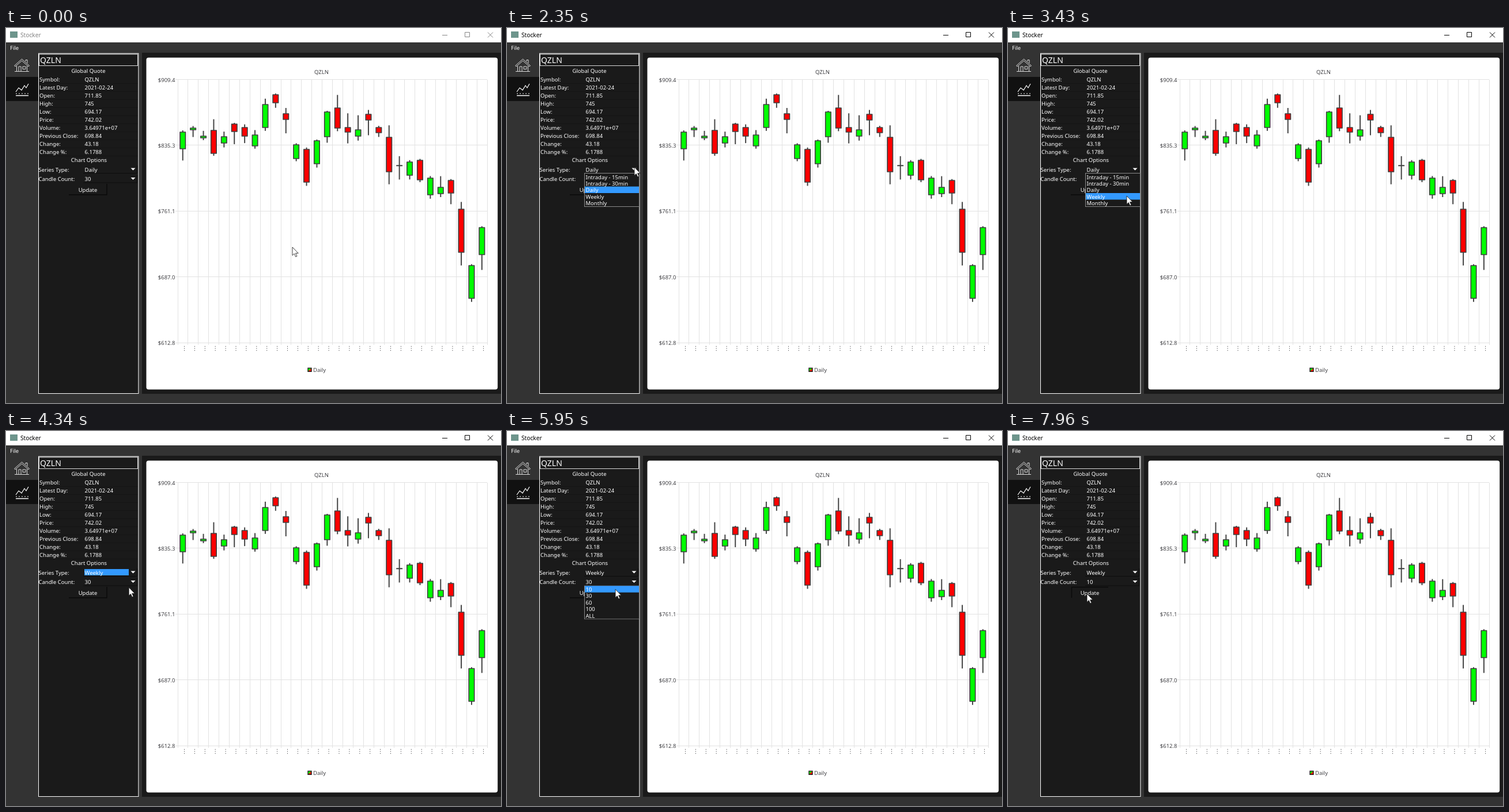
An HTML page for the animation above (8000 ms loop, 859x652 px).

```html
<!DOCTYPE html>
<html lang="en">
<head>
<meta charset="utf-8">
<title>Stocker</title>
<style>
  html, body { margin: 0; width: 100%; height: 100%; overflow: hidden; background: #333; }
  svg { display: block; }
  text { font: 9.5px "Noto Sans", "Open Sans", sans-serif; fill: #fff; white-space: pre; }
  .mid { text-anchor: middle; }
  .chart text { fill: #404044; }
  .crisp { shape-rendering: crispEdges; }
</style>
</head>
<body>
<svg id="stage" width="859" height="652" viewBox="0 0 859 652"></svg>
<script>
const LOOP = 8000;
const SYMBOL = 'QZLN';
const ROW = 11.4;

const rect = (x, y, w, h, fill, extra = '') =>
  `<rect x="${x}" y="${y}" width="${w}" height="${h}" fill="${fill}" ${extra}/>`;
const text = (x, y, s, extra = '') => `<text x="${x}" y="${y}" ${extra}>${s}</text>`;
const path = (d, stroke, width = 1, extra = '') =>
  `<path d="${d}" fill="none" stroke="${stroke}" stroke-width="${width}" ${extra}/>`;
const crisp = 'class="crisp"';
const centred = 'class="mid"';

function titleBar() {
  return rect(0, 0, 859, 25, '#fff') + rect(7, 6, 13, 11, '#6d958c') +
    text(25, 15.5, 'Stocker', 'id="caption" style="font-size:10.2px;fill:inherit"') +
    path('M757 12.5h9M796.5 7.5h8v8h-8zM836 7.5l9 9M845 7.5l-9 9', '', 1, 'id="controls"') +
    text(7, 38, 'File');
}

function sideBar() {
  const roof = 'M14.5 65.5L27.5 54L40.5 65.5L39 67L27.5 57L16 67Z';
  const walls = 'M34 58V55.5h3V61M18.5 66V75.5M36.5 66V75.5M15 75.5H40';
  const openings = 'M22 75V67h4V75M29 67h5v4.5h-5z';
  return rect(0, 85, 56, 42, '#111') + path(roof + walls + openings, '#eee', .9) +
    path('M17 111L22 104L27 108L32 100L35 104L39 97', '#fff', 1.2) +
    path('M17 114H39', '#fff', 1, 'stroke-dasharray="2 3"') + path('M17 117.5H39', '#fff', 1.5);
}

function quotePanel() {
  const quote = {
    'Symbol:': SYMBOL, 'Latest Day:': '2021-02-24', 'Open:': '711.85', 'High:': '745',
    'Low:': '694.17', 'Price:': '742.02', 'Volume:': '3.64971e+07',
    'Previous Close:': '698.84', 'Change:': '43.18', 'Change %:': '6.1788' };
  const rows = Object.entries(quote).map(([label, value], i) => {
    const y = 92.5 + 14 * i;
    return text(58, y, label) + text(136.5, y, value) + rect(57, y + 3, 172, 1, '#151515', crisp);
  }).join('');
  return rect(56.5, 44.2, 173.4, 591.3, '#1a1a1a', 'stroke="#fff"') +
    rect(57.5, 45.7, 171, 19.8, '#1a1a1a', 'stroke="#d8d8d8"') +
    text(59, 61, SYMBOL, 'style="font-size:14px"') +
    text(143, 77.5, 'Global Quote', centred) + rows +
    text(144, 233, 'Chart Options', centred) +
    text(56.5, 249.5, 'Series Type:') + text(56.5, 266, 'Candle Count:');
}

function combo(id, y) {
  return path(`M134 ${y + 13.5}H228M227.5 ${y}V${y + 13}`, '#0d0d0d') +
    rect(136, y + 1, 77, 11, '#39f', `id="${id}Focus" ${crisp}`) +
    text(136.5, y + 10.5, '', `id="${id}Value"`) +
    `<path d="M216.5 ${y + 4.5}h8l-4 4z" fill="#fff"/>`;
}

function popup({ id, y, items }) {
  const h = items.length * ROW + 1;
  return `<clipPath id="${id}Clip"><rect x="134" y="${y}" width="96" height="${h + 1}"/></clipPath>
    <g clip-path="url(#${id}Clip)"><g id="${id}Popup">` +
    rect(134.5, y + .5, 95, h, '#1a1a1a', 'stroke="#8a8a8a"') +
    rect(135, 0, 94, ROW, '#39f', `id="${id}Row"`) +
    items.map((s, i) => text(136.5, y + 10.5 + i * ROW, s)).join('') + '</g></g>';
}

const noise = n => Math.abs(Math.sin(n * 127.1 + 3) * 43758.5) % 1;

function chart() {
  const left = 298, right = 835, top = 89.5, bottom = 547, step = (right - left) / 30;
  // y positions of each day's open and close
  const bodies = [
    [210, 181], [177, 174], [191, 188], [178, 218], [200, 189], [167, 180], [173, 188], [205, 186],
    [173, 133], [116, 130], [149, 159], [227, 203], [211, 268], [236, 196], [189, 146], [139, 174],
    [173, 181], [188, 177], [150, 160], [173, 182], [190, 250], [239, 239.5], [256, 233], [230, 264],
    [290, 261], [288, 277], [265, 287], [315, 390], [470, 413], [394, 347]];
  let out = rect(243.5, 51.5, 609.7, 577, '#fff', 'rx="4"') + text(547.5, 79.5, SYMBOL, centred);

  ['$909.4', '$835.3', '$761.1', '$687.0', '$612.8'].forEach((label, i) => {
    const y = top + (bottom - top) * i / 4;
    out += path(`M294 ${y}H${right}`, '#e2e2e2', 1, crisp) +
      text(293.5, y + 4, label, 'text-anchor="end"');
  });
  for (let i = 0; i <= 30; i++) {
    const x = left + i * step;
    out += path(`M${x} ${top}V${bottom + 4}`, '#e2e2e2', 1, crisp);
    if (i < 30) out += path(`M${x + 11.5} 553v9`, '#404044', 1, 'stroke-dasharray="1.2 2.3"');
  }

  bodies.forEach(([open, close], i) => {
    const x = left + (i + .5) * step - .2;
    const high = Math.min(open, close), low = Math.max(open, close);
    const upper = 2 + 26 * noise(i) ** 2, lower = 4 + 26 * noise(i + 50) ** 2;
    out += path(`M${x} ${high - upper}V${low + lower}`, '#444', 2) +
      rect(x - 4.7, high, 9.4, low - high, close < open ? '#0f0' : '#f00',
        'stroke="#404040" stroke-width="1.7" stroke-linejoin="round"');
  });
  return `<g class="chart">${out}` +
    rect(524, 591.3, 6, 6, '#0f0') + '<path d="M530 591.3v6h-6z" fill="red"/>' +
    rect(524, 591.3, 6, 6, 'none', 'stroke="#222" stroke-width="1.4"') +
    text(533, 598, 'Daily') + '</g>';
}

const menus = [
  { id: 'series', y: 252, items: ['Intraday - 15min', 'Intraday - 30min', 'Daily', 'Weekly', 'Monthly'],
    before: 2, after: 3, open: 2220, close: 3730, blur: 4740 },
  { id: 'count', y: 268.5, items: ['10', '30', '60', '100', 'ALL'],
    before: 1, after: 0, open: 4740, close: 6670, blur: 7790 }];

document.getElementById('stage').innerHTML =
  rect(0, 0, 859, 652, '#333') + titleBar() + sideBar() +
  rect(236, 43, 623, 593, '#1a1a1a') + quotePanel() +
  combo('series', 239) + combo('count', 255.5) +
  path('', '#0a0a0a', 1.4, 'id="button"') + text(142, 284.5, 'Update', centred) +
  menus.map(popup).join('') + chart() +
  `<path id="cursor" d="M0 0V14.4L3.3 11.4L5.7 16.8L7.9 15.8L5.6 10.6H10.2Z"
    fill="#fff" stroke="#111" stroke-width=".8"/>`;

const el = id => document.getElementById(id);
const set = (id, name, value) => el(id).setAttribute(name, value);

// Each pointer move is an eased curve from the last stop, pulled towards `bend`.
const home = [497, 381];
const moves = [
  { start: 940, end: 1690, bend: [265, 365], to: [221, 242] },
  { start: 2790, end: 3430, bend: [198, 299], to: [206, 292] },
  { start: 4100, end: 4600, bend: [215, 265], to: [218, 262] },
  { start: 5670, end: 6170, bend: [180, 280], to: [185, 275] },
  { start: 6980, end: 7670, bend: [194, 310], to: [137, 283] }];

function pointer(t) {
  return moves.reduce((from, { start, end, bend, to }) => {
    const u = Math.min(1, Math.max(0, (t - start) / (end - start)));
    const e = u * u * (3 - 2 * u);
    return from.map((p, k) => (1 - e) ** 2 * p + 2 * e * (1 - e) * bend[k] + e * e * to[k]);
  }, home);
}

function drawMenu({ id, y, items, before, after, open, close, blur }, t, tipY) {
  const closed = t >= close;
  const slide = Math.min(1, (t - open) / 120) - 1;
  const hovered = Math.floor((tipY - y) / ROW);
  const row = items[hovered] ? hovered : before;
  set(id + 'Popup', 'display', t >= open && !closed ? 'inline' : 'none');
  set(id + 'Popup', 'transform', `translate(0 ${slide * (items.length * ROW + 2)})`);
  set(id + 'Row', 'y', y + .8 + row * ROW);
  set(id + 'Focus', 'display', closed && t < blur ? 'inline' : 'none');
  el(id + 'Value').textContent = items[closed ? after : before];
}

function draw(t) {
  const [x, y] = pointer(t);
  const ink = t < 2180 ? '#858585' : '#000';
  el('caption').style.fill = ink;
  set('controls', 'stroke', ink);
  menus.forEach(menu => drawMenu(menu, t, y));
  set('button', 'd', t < 7790 ? 'M109 290H175V271' : 'M110.5 290V271.5H174');
  set('cursor', 'transform', `translate(${x} ${y})`);
}

const start = performance.now();
function tick() {
  draw((performance.now() - start) % LOOP);
  requestAnimationFrame(tick);
}
tick();
</script>
</body>
</html>
```
